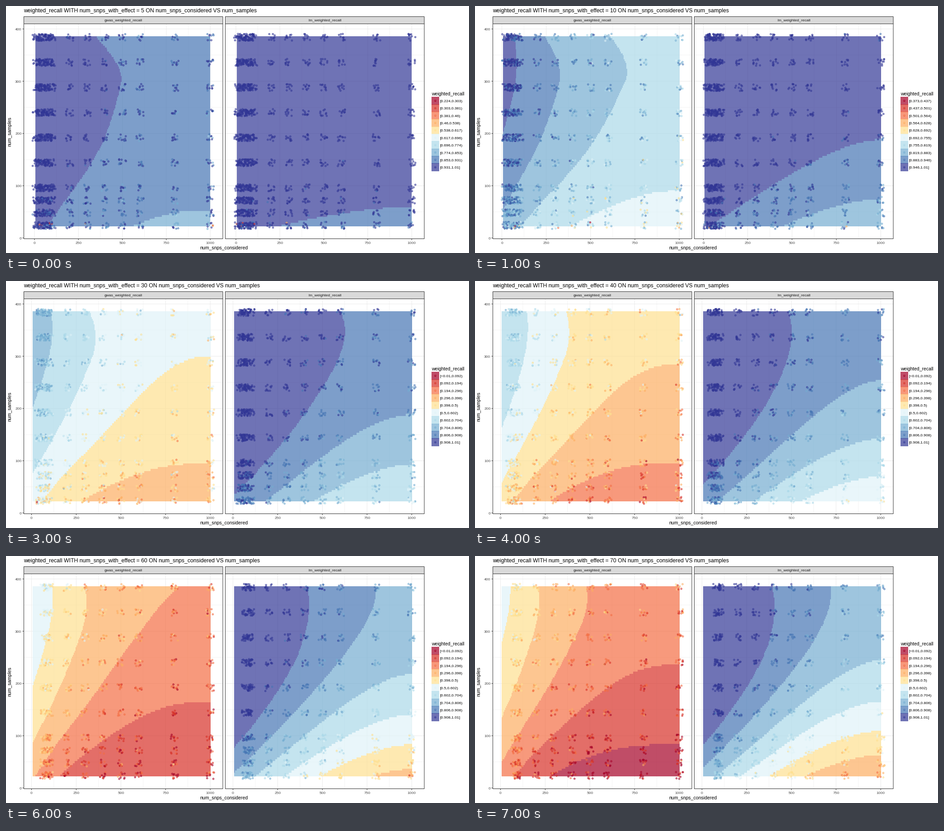
Write a matplotlib script that moves like this. It is 1025 px wide and 547 px high and loops after 8 s.

```python
import numpy as np
import matplotlib.pyplot as plt
from matplotlib.animation import FuncAnimation

W, H, DPI = 1025, 547, 100
PX = 72 / DPI  # points per pixel

plt.rcParams["font.family"] = "Liberation Sans"
plt.rcParams["path.snap"] = False

PALETTE = ["#A50026", "#D73027", "#F46D43", "#FDAE61", "#FEE090",
           "#E0F3F8", "#ABD9E9", "#74ADD1", "#4575B4", "#313695"]
RGB = np.array([[int(c[i:i + 2], 16) / 255 for i in (1, 3, 5)] for c in PALETTE])
INK, GRID = "#333333", "#EBEBEB"

TOP, BOTTOM, STRIP = 39.5, 515.5, 23.5
X_LOW, X_HIGH, Y_LOW, Y_HIGH = 6, 1000, 22.2, 385.7
SAMPLES = [24, 48, 72, 96, 144, 192, 240, 288, 336, 384]
WIDE_SNPS = [200, 300, 400, 500, 600, 800, 1000]
REPEATS = 10

EFFECTS = [5, 10, 20, 30, 40, 50, 60, 70]
KEY_EFFECTS = [5, 10, 20, 30, 50, 70]
# Recall surface: far corner, loss with few samples, gain with few SNPs.
GWAS_FAR = [.89, .8085, .6526, .5225, .334, .2545]
GWAS_LOSS = [.042, .071, .137, .17, .193, .21]
GWAS_GAIN = [.15, .17, .22, .255, .305, .29]
LM_FAR = [.98, .986, .912, .885, .804, .77]
LM_LOSS = [.061, .143, .195, .285, .365, .479]
LM_GAIN = [.02, .1, .06, .112, .29, .33]
LM_RISE = [0, .01, .16, .18, .09, .145]

fig = plt.figure(figsize=(W / DPI, H / DPI), dpi=DPI, facecolor="white")
ax = fig.add_axes([0, 0, 1, 1])


def at_effect(effect, *tables):
    return [np.interp(effect, KEY_EFFECTS, t) for t in tables]


def shares(x, y):
    """How few SNPs and how few samples, each from 0 to 1."""
    few_snps = np.clip(1 - x / 1000, 0, 1)
    few_samples = np.clip((Y_HIGH - y) / (Y_HIGH - Y_LOW), 0, 1)
    return few_snps, few_samples


def gwas_recall(x, y, effect):
    far, loss, gain = at_effect(effect, GWAS_FAR, GWAS_LOSS, GWAS_GAIN)
    u, w = shares(x, y)
    base = min(2.5, 1.6 + .02 * effect)
    power = base + (3 - base) * np.clip(1 - 4 * w, 0, 1) ** 2 + 2.2 * w ** 5
    return far - loss * w ** 1.4 + gain * (1 - .25 * w ** 4) * u ** power


def lm_recall(x, y, effect):
    far, loss, gain, rise = at_effect(effect, LM_FAR, LM_LOSS, LM_GAIN, LM_RISE)
    u, w = shares(x, y)
    return far - loss * w ** 2.1 + (gain + rise * np.sin(np.pi * w / 2)) * u ** 1.75


# Strip title, surface and spread of the single runs, in bins.
PANELS = [("gwas_weighted_recall", gwas_recall, .9),
          ("lm_weighted_recall", lm_recall, .5)]


class Scene:
    def __init__(self, effect):
        self.effect = effect
        self.low = {5: .224, 10: .3733, 20: .0813}.get(effect, -.01)
        self.zero = {5: 63, 10: 59.5}.get(effect, 56.5)
        self.scale = (452.2 - self.zero) / 1000
        self.shift = -.7 if effect == 20 else 0  # room for the longest label

    def level(self, recall):
        return 10 * (recall - self.low) / (1.01 - self.low)


def to_bin(level):
    return np.clip(np.floor(level), 0, 9).astype(int)


def to_y(v):
    return 513.7 - 1.157 * np.asarray(v)


def label(x, y, s, px, color="black", **kw):
    kw.setdefault("va", "baseline")
    ax.text(x, y, s, fontsize=px * PX, color=color, **kw)


def line(xs, ys, px, color, z):
    ax.plot(xs, ys, color=color, lw=px * PX, zorder=z, solid_capstyle="butt")


def box(x, y, w, h, face, edge="none", px=0, z=1, **kw):
    ax.add_patch(plt.Rectangle((x, y), w, h, facecolor=face, edgecolor=edge,
                               lw=px * PX, zorder=z, **kw))


def rings(x, y, colors):
    ax.scatter(x, y, s=(3.7 * PX) ** 2, facecolors="none", edgecolors=colors,
               linewidths=.75 * PX, zorder=4)
    ax.scatter(x, y, s=(1.7 * PX) ** 2, c=colors, linewidths=0, zorder=4)


def draw_points(scene, recall, spread, to_x, rng):
    n = scene.effect
    snps = list(range(10 * (n // 10 + 1), 101, 10)) + WIDE_SNPS
    x, y = (g.ravel().repeat(REPEATS) for g in np.meshgrid(snps, SAMPLES))
    sigma = spread * (.55 + .5 * x / 1000 + .45 * np.clip(1 - y / 100, 0, 1))
    level = scene.level(recall(x, y, n)) + 3 / n + rng.normal(0, 1, x.size) * sigma
    # A few runs fail with the smallest samples.
    failed = (y == SAMPLES[0]) & (rng.random(x.size) < .25 / n)
    level = np.where(failed, rng.uniform(0, 4, x.size), level)
    rings(to_x(x + rng.uniform(-21, 21, x.size)),
          to_y(y + rng.uniform(-6.6, 6.6, x.size)), RGB[to_bin(level)])


def draw_surface(scene, recall, to_x):
    xs = np.linspace(X_LOW, X_HIGH, 200)
    ys = np.linspace(Y_LOW, Y_HIGH, 101)
    gx, gy = np.meshgrid((xs[1:] + xs[:-1]) / 2, (ys[1:] + ys[:-1]) / 2)
    bins = to_bin(scene.level(recall(gx, gy, scene.effect)))
    rgba = np.dstack([RGB[bins], np.full(bins.shape, .7)])
    ax.imshow(rgba, extent=(to_x(X_LOW), to_x(X_HIGH), to_y(Y_LOW), to_y(Y_HIGH)),
              origin="lower", interpolation="nearest", aspect="auto", zorder=2)


def draw_panel(scene, panel, offset, rng):
    name, recall, spread = panel
    left = 39.5 + offset
    width = 440.5 + scene.shift
    edge = left + width

    def to_x(v):
        return scene.zero + offset + scene.scale * np.asarray(v)

    for v in range(0, 1001, 125):
        line([to_x(v)] * 2, [TOP, BOTTOM], .5 if v % 250 else 1, GRID, 1)
    for v in range(0, 401, 50):
        line([left, edge], [to_y(v)] * 2, .5 if v % 100 else 1, GRID, 1)

    draw_surface(scene, recall, to_x)
    draw_points(scene, recall, spread, to_x, rng)

    box(left, TOP, width, BOTTOM - TOP, "none", INK, 1, 5)
    box(left, STRIP, width, TOP - STRIP, "#D9D9D9", INK, 1, 5)
    label(left + width / 2, 34, name, 8.5, "#1A1A1A", ha="center", zorder=6)
    for v in range(0, 1001, 250):
        line([to_x(v)] * 2, [BOTTOM, BOTTOM + 3], 1, INK, 5)
        label(to_x(v), 527, v, 8.5, "#4D4D4D", ha="center")


def draw_legend(scene):
    x = 942 + 2.5 * scene.shift
    label(x, 198, "weighted_recall", 10.4)
    cuts = [f"{c:.3g}".replace("-", "\u2212") for c in np.linspace(scene.low, 1.01, 11)]
    for i, color in enumerate(PALETTE):
        y = 201.7 + 16.36 * i
        box(x, y, 16.6, 16.36, color, alpha=.7, antialiased=False)
        rings([x + 8.3], [y + 8.2], [color])
        label(x + 18.3, y + 11.3, f"[{cuts[i]},{cuts[i + 1]}{')' if i < 9 else ']'}", 8.5)


def draw(frame):
    scene = Scene(EFFECTS[frame])
    rng = np.random.default_rng(100 + frame)
    ax.clear()
    ax.axis("off")
    for panel, offset in zip(PANELS, (0, 446 + scene.shift / 2)):
        draw_panel(scene, panel, offset, rng)
    for v in range(0, 401, 100):
        line([36.5, 39.5], [to_y(v)] * 2, 1, INK, 5)
        label(34.3, to_y(v) + 3, v, 8.5, "#4D4D4D", ha="right")
    label(39, 14, f"weighted_recall WITH num_snps_with_effect = {scene.effect} "
                  "ON num_snps_considered VS num_samples", 12.3)
    label(482.7 + scene.shift / 2, 539, "num_snps_considered", 10.5, ha="center")
    label(13, 277.7, "num_samples", 10.5, ha="right", va="center", rotation=90)
    draw_legend(scene)
    ax.set_xlim(0, W)
    ax.set_ylim(H, 0)
    return []


anim = FuncAnimation(fig, draw, frames=len(EFFECTS), init_func=lambda: [],
                     interval=1000, repeat=True, blit=False)
plt.show()
```
